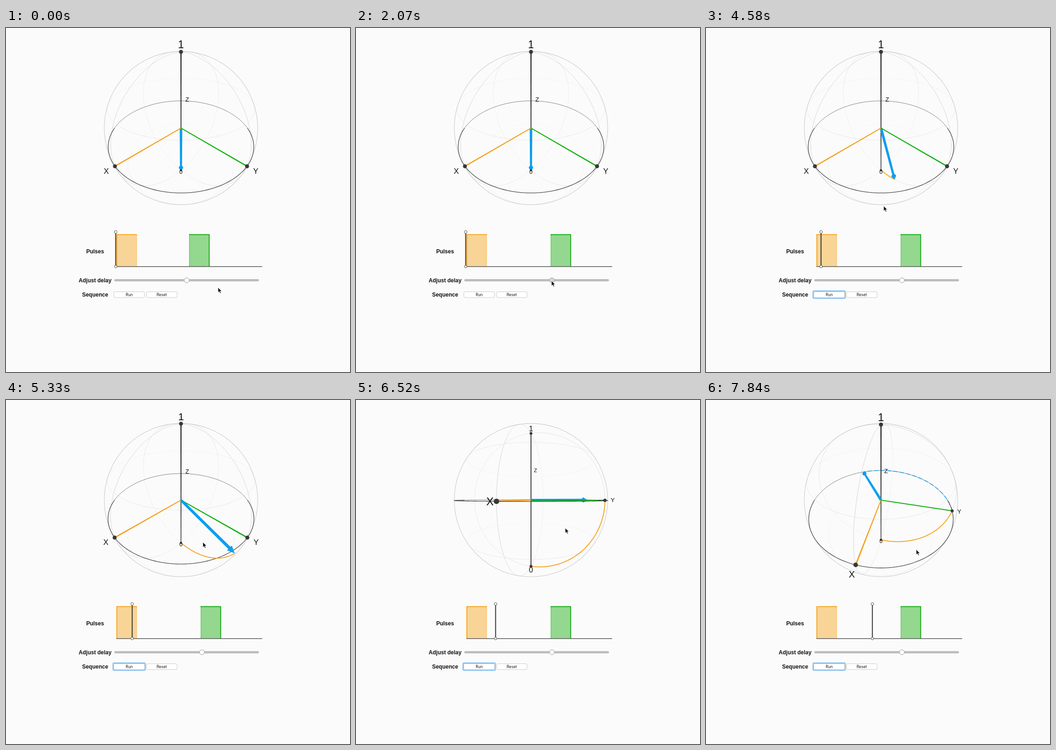
An HTML page with a canvas that plays this animation: 748x748 px, repeating every 7.99 s.

```html
<!DOCTYPE html>
<html lang="en">
<head>
<meta charset="utf-8">
<title>Pulse sequence on a Bloch sphere</title>
<style>
  html, body { margin: 0; width: 100%; height: 100%; overflow: hidden; background: #fbfbfb; }
  canvas, svg { position: absolute; left: 0; top: 0; width: 748px; height: 748px; }
  text { font-family: "Liberation Sans", Arial, sans-serif; text-anchor: middle; fill: #111; }
  .caption { font-size: 12px; font-weight: bold; }
  .button rect { fill: #fff; stroke: #c9c9c9; }
  .button text { font: 8.4px Inter, Roboto, sans-serif; }
  .dots { stroke-width: 1.4; stroke-dasharray: 1.5 1.5; }
  .dot { fill: #fff; stroke: #444; }
</style>
</head>
<body>
<canvas id="sphere" width="748" height="748"></canvas>
<svg viewBox="0 0 748 748">
  <g id="labels"></g>

  <text class="caption" x="193.8" y="490">Pulses</text>
  <text class="caption" x="193.8" y="552.8">Adjust delay</text>
  <text class="caption" x="193.8" y="583.8">Sequence</text>

  <g fill="none" stroke="#f5a623">
    <rect x="241" y="449" width="43" height="69.5" fill="#f8d596" stroke="none"/>
    <path d="M241 518V449.2H284.8" stroke-width="2"/>
    <path class="dots" d="M284 450V518"/>
  </g>
  <g id="green" fill="none" stroke="#1aad1a">
    <rect y="449" width="43" height="69.5" fill="#93d88e" stroke="none"/>
    <path d="M-.8 449.2H43V518" stroke-width="2"/>
    <path class="dots" d="M0 450V518"/>
  </g>
  <path id="base" d="M240 518.8H557" stroke="#555" stroke-width="1.4"/>
  <g id="marker">
    <path d="M0 446V516" stroke="#333" stroke-width="2"/>
    <circle class="dot" cy="443.5" r="3"/>
    <circle class="dot" cy="518.7" r="2.8"/>
  </g>

  <rect x="236" y="546.8" width="313.5" height="3.4" rx="1.5" fill="#c4c4c4" stroke="#9a9a9a" stroke-width=".8"/>
  <circle id="knob" cy="548.5" r="5.4" stroke="#999"/>

  <rect id="focus" x="232.8" y="571.8" width="70" height="15.8" rx="2" fill="none" stroke="#7dbcf3" stroke-width="2.2"/>
  <g class="button"><rect x="234.5" y="573.5" width="66.5" height="12.6" rx="2.8"/><text x="268" y="582.8">Run</text></g>
  <g class="button"><rect x="305.5" y="573.5" width="66.5" height="12.6" rx="2.8"/><text x="338.7" y="582.8">Reset</text></g>

  <path id="cursor" d="M0 0V11.4L2.6 9L4.5 13.2L6.5 12.3L4.7 8.3H8.2Z" fill="#111" stroke="#fff" stroke-width=".9"/>
</svg>
<script>
const LOOP = 7990, STEP = LOOP / 54;
const CX = 380.5, CY = 217.7, FOCAL = 289, DIST = 2;
const ORANGE = '#f5a01e', GREEN = '#10b010', BLUE = '#0d9eee', DARK = '#383838';
const { sin, cos, PI } = Math;
const $ = id => document.getElementById(id);
const ctx = $('sphere').getContext('2d');

// Keys: time, then values; straight moves between them.
const POINTER = [
  [0, 461, 564], [740, 394, 548], [890, 394, 548], [2070, 425, 549.5],
  [2512, 425, 549.5], [3400, 281, 577], [3850, 281, 577], [4880, 428, 311],
  [5330, 428, 309], [5930, 449, 286], [6520, 455, 278], [7250, 455, 308], [7840, 457, 325]
];
const CAMERA = [ // azimuth, elevation
  [5030, .7854, .6155], [5330, .7854, .6], [5930, .43, .19], [6520, .27, .007],
  [7110, .28, .275], [7250, .28, .35], [7840, .238, .67]
];
const KNOB = [[890, 393], [2070, 426]];

function track(keys, t) {
  if (t <= keys[0][0]) return keys[0].slice(1);
  for (let i = 1; i < keys.length; i++) {
    const a = keys[i - 1], b = keys[i];
    if (t <= b[0]) {
      const u = (t - a[0]) / (b[0] - a[0]);
      return a.slice(1).map((v, j) => v + (b[j + 1] - v) * u);
    }
  }
  return keys[keys.length - 1].slice(1);
}

let azimuth, elevation;

function project([x, y, z]) {
  const right = y * cos(azimuth) - x * sin(azimuth);
  const toward = x * cos(azimuth) + y * sin(azimuth);
  const up = z * cos(elevation) - toward * sin(elevation);
  const depth = DIST - toward * cos(elevation) - z * sin(elevation);
  const scale = FOCAL / depth;
  return { x: CX + right * scale, y: CY - up * scale, depth, scale };
}

const scaled = (v, k) => v.map(c => c * k);
const around = a => [cos(a), sin(a), 0];

function polygon(points, color) {
  ctx.beginPath();
  points.forEach(p => ctx.lineTo(p.x, p.y));
  ctx.closePath();
  ctx.fillStyle = color;
  ctx.fill();
}

function curve(at, from, to, color, width, dash = []) {
  ctx.beginPath();
  for (let i = 0; i <= 90; i++) {
    const p = project(at(from + (to - from) * i / 90));
    ctx.lineTo(p.x, p.y);
  }
  ctx.setLineDash(dash);
  ctx.strokeStyle = color;
  ctx.lineWidth = width;
  ctx.stroke();
  ctx.setLineDash([]);
}

// Faint circle that fades with distance from the camera.
function grid(at, near, far) {
  const n = 24;
  for (let i = 0; i < n; i++) {
    const a = i * 2 * PI / n, b = a + 2 * PI / n;
    const u = Math.min(1, Math.max(0, (project(at((a + b) / 2)).depth - 1.1) / 1.5));
    const g = Math.round(near + (far - near) * u);
    curve(at, a, b, `rgb(${g},${g},${g})`, 1);
  }
}

// Straight rod with perspective taper.
function rod(from, to, radius, color) {
  const a = project(from), b = project(to);
  const len = Math.hypot(b.x - a.x, b.y - a.y) || 1;
  const nx = (a.y - b.y) / len, ny = (b.x - a.x) / len;
  const side = (p, s) => ({ x: p.x + nx * s * radius * p.scale, y: p.y + ny * s * radius * p.scale });
  polygon([side(a, 1), side(b, 1), side(b, -1), side(a, -1)], color);
}

function ball(v) {
  const p = project(v);
  ctx.beginPath();
  ctx.arc(p.x, p.y, .0212 * p.scale, 0, 2 * PI);
  ctx.fillStyle = DARK;
  ctx.fill();
}

function arrow(v) {
  const [x, y, z] = v, flat = Math.hypot(x, y);
  const s = flat > 1e-6 ? [-y / flat, x / flat, 0] : [1, 0, 0];
  const w = [y * s[2] - z * s[1], z * s[0] - x * s[2], x * s[1] - y * s[0]];
  const foot = scaled(v, .92), tip = project(v);
  const ring = Array.from({ length: 25 }, (_, i) => {
    const a = i * 2 * PI / 24;
    return project(foot.map((c, j) => c + .04 * (s[j] * cos(a) + w[j] * sin(a))));
  });
  rod([0, 0, 0], foot, .0195, BLUE);
  polygon(ring, BLUE);
  for (let i = 0; i < 24; i++) polygon([ring[i], ring[i + 1], tip], BLUE);
}

const LABELS = [
  ['X', [1.09, 0, 0], 23], ['Y', [0, 1.09, 0], 23],
  ['1', [0, 0, 1.063], 32], ['0', [0, 0, -1.06], 32], ['Z', [-.06, .055, .45], 23]
].map(([name, at, size]) => {
  const el = document.createElementNS('http://www.w3.org/2000/svg', 'text');
  el.textContent = name;
  $('labels').append(el);
  return { el, at, size };
});

const flip = a => [0, sin(a), -cos(a)];

function drawSphere(pulse, phase) {
  ctx.clearRect(0, 0, 748, 748);
  for (const s of [-.5, .5]) grid(a => [.866 * cos(a), .866 * sin(a), s], 228, 244);
  grid(a => [sin(a), 0, cos(a)], 206, 236);
  grid(a => [0, sin(a), cos(a)], 206, 236);

  ctx.beginPath();
  ctx.arc(CX, CY, FOCAL / Math.sqrt(DIST * DIST - 1), 0, 2 * PI);
  ctx.strokeStyle = '#cbcbcb';
  ctx.lineWidth = 1.1;
  ctx.stroke();

  curve(around, azimuth + PI / 2, azimuth + 1.5 * PI, '#7d7d7d', 1);
  if (phase > 0) curve(around, PI / 2, PI / 2 + phase, BLUE, 1.5, [9, 5]);
  rod([0, 0, -1], [0, 0, 1], .0068, DARK);

  const spin = phase > 0 ? around(PI / 2 + phase) : flip(pulse * PI / 2);
  const behind = project(spin).depth > DIST;
  if (behind) arrow(spin);
  rod([0, 0, 0], [1, 0, 0], .0068, ORANGE);
  rod([0, 0, 0], [0, 1, 0], .0068, GREEN);
  curve(around, azimuth - PI / 2, azimuth + PI / 2, '#484848', 1.3);
  if (pulse > 0) curve(flip, 0, pulse * PI / 2, ORANGE, 1.8);
  [[1, 0, 0], [0, 1, 0], [0, 0, 1], [0, 0, -1]].forEach(ball);
  if (!behind) arrow(spin);

  for (const { el, at, size } of LABELS) {
    const p = project(at), px = size / p.depth;
    el.setAttribute('x', p.x);
    el.setAttribute('y', p.y + px * .36 - 1);
    el.style.fontSize = px + 'px';
  }
}

const move = (id, x, y = 0) => $(id).setAttribute('transform', `translate(${x} ${y})`);
const RUN = 3850, PULSE_END = 6063;

function draw(t) {
  const run = t >= RUN - 5;
  const [knob] = track(KNOB, t);
  [azimuth, elevation] = track(CAMERA, t);

  // The pulse eases in and out, the free precession is steady.
  const u = Math.min(1, Math.max(0, (t - RUN) / (PULSE_END - RUN)));
  const pulse = u < .5 ? 2 * u * u : 1 - 2 * (1 - u) ** 2;
  const drift = Math.max(0, t - PULSE_END) * .0437;
  drawSphere(pulse, drift * 1.606 * PI / 180);

  move('marker', run ? 240.5 + 43.5 * pulse + drift : 238.5);
  move('green', 398.8 + (knob - 393) * .758);
  move('cursor', ...track(POINTER, t));
  $('base').setAttribute('d', `M${run ? 240 : 238}  518.8H557`);
  $('knob').setAttribute('cx', knob);
  $('knob').setAttribute('fill', t > 1000 && t < 2600 ? '#d6d6d6' : '#fcfcfc');
  $('focus').style.display = run ? '' : 'none';
}

const start = performance.now();
let last = -1;
function tick() {
  const t = (performance.now() - start) % LOOP;
  const step = Math.min(53, Math.floor((t + 6) / STEP));
  if (step !== last) draw((last = step) * STEP);
  requestAnimationFrame(tick);
}
tick();
</script>
</body>
</html>
```
